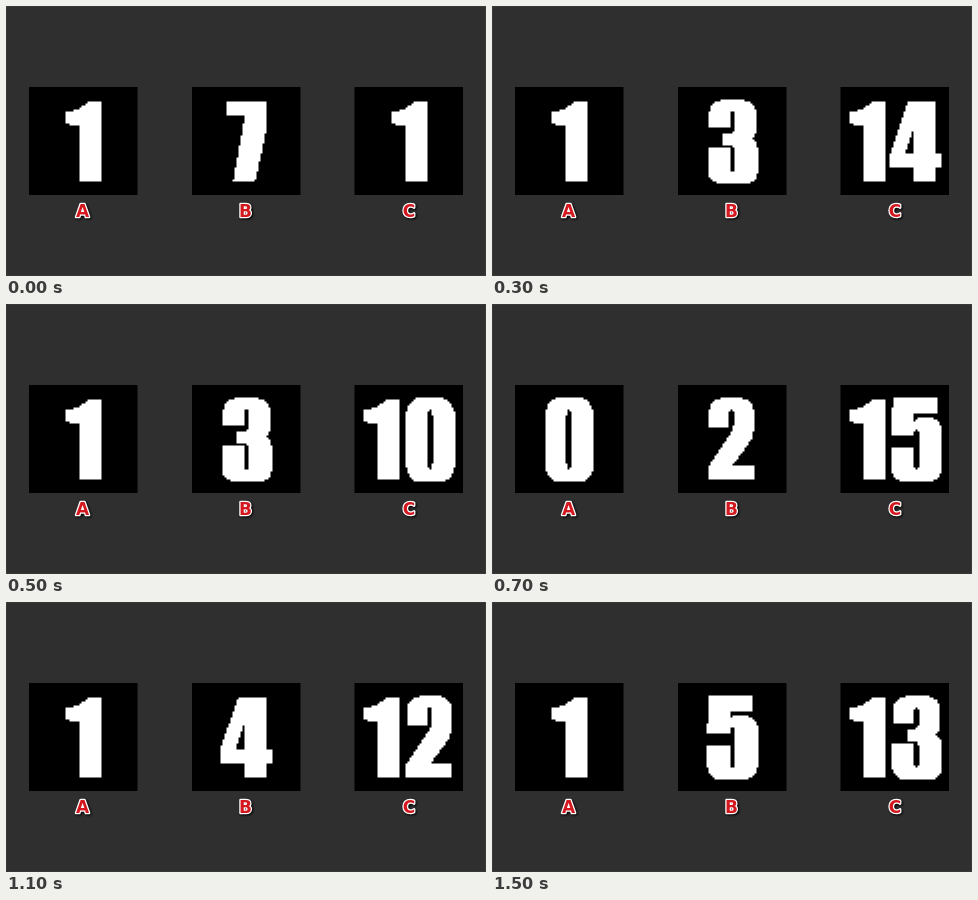
Write an HTML page with a canvas that moves like this. It is 480x270 px and loops after 1.6 s.

```html
<!DOCTYPE html>
<html lang="en">
<head>
<meta charset="utf-8">
<title>Random numbers</title>
<style>
html, body { margin: 0; width: 100%; height: 100%; overflow: hidden; background: #2f2f2f; }
#stage { position: relative; width: 480px; height: 270px; overflow: hidden; }
#stage::after { content: ""; position: absolute; inset: 0; border: 1px solid #393939; }
canvas, svg { position: absolute; left: 0; top: 0; }
text {
  font: bold 17px "DejaVu Sans", sans-serif; text-anchor: middle;
  fill: #d3191f; stroke: #fff; stroke-width: 2.6px; stroke-linejoin: round; paint-order: stroke;
  filter: drop-shadow(1px 1px 1px #000);
}
</style>
</head>
<body>
<div id="stage">
  <canvas id="view" width="480" height="270"></canvas>
  <svg width="480" height="270">
    <text x="76.5" y="211">A</text>
    <text x="239.5" y="211">B</text>
    <text x="403" y="211">C</text>
  </svg>
</div>
<script>
const CELL = 2, SIZE = 54, STEP = 100, TOP = 81, PHASE = 0.5;
const lefts = [23, 186, 348.5];

// Digit outlines in tile pixels
const glyphs = {
  0: "M42 13H66Q76 15 79 29V81Q76 95 66 97H42Q33 95 30 81V29Q33 15 42 13ZM53 25L51 32V78L53 84H55L57 78V32L55 25Z",
  1: "M58 15H73V95H51V43Q51 39 48 38.5L37 37V25Q50 24 58 15Z",
  2: "M31 43V30Q31 13 48 13H60Q76 13 76 30V42Q76 52 69 61L54 81H76V95H30V82L50 52Q56 44 56 36V30Q56 25 53.5 25Q51 25 51 30V43Z",
  3: "M31 40V29Q31 13 48 13H62Q78 13 78 28V43Q78 50 73 52Q80 55 80 64V82Q80 97 64 97H47Q30 97 30 82V60H52V80Q52 85 54.5 85Q57 85 57 80V65Q57 58 51 58H45V46H50Q57 46 57 41V30Q57 25 54.5 25Q52 25 52 30V40Z",
  4: "M46 15H74V67H80V81H74V95H52V81H28V67ZM52 40L43 67H52Z",
  5: "M31 13H75V28H52V36Q56 32 62 32Q80 32 80 48V80Q80 97 62 97H46Q29 97 29 80V62H52V80Q52 85 54.5 85Q57 85 57 80V50Q57 45 54.5 45Q52 45 52 51H29Z",
  7: "M35 15H75V36Q74 45 73 50L63 95H41L53 28H35Z"
};
for (const d in glyphs) glyphs[d] = new Path2D(glyphs[d]);

const rows = [
  "1 0 0 1 0 1 1 0 1 0 0 1 1 0 0 1",
  "7 1 4 3 5 3 0 2 5 7 1 4 2 5 0 5",
  "1 5 12 14 3 10 7 15 2 10 4 12 0 1 11 13"
].map(row => row.split(" "));

const view = document.getElementById("view").getContext("2d");
const small = document.createElement("canvas").getContext("2d");
small.canvas.width = small.canvas.height = SIZE;
small.fillStyle = "#fff";

// Coarse fill: a cell is white when its centre lies inside the outline
function drawDigit(digit, shift) {
  for (let y = 0; y < SIZE; y++) {
    for (let x = 0; x < SIZE; x++) {
      const px = (x + 0.5) * CELL + PHASE - shift, py = (y + 0.5) * CELL + PHASE;
      if (small.isPointInPath(glyphs[digit], px, py, "evenodd")) small.fillRect(x, y, 1, 1);
    }
  }
}

function drawTile(left, number) {
  small.clearRect(0, 0, SIZE, SIZE);
  const shifts = number.length > 1 ? [-28, 21] : [0];
  shifts.forEach((shift, i) => drawDigit(number[i], shift));
  view.fillStyle = "#000";
  view.fillRect(left, TOP, 108.5, 108);
  view.drawImage(small.canvas, Math.round(left) + PHASE, TOP + PHASE, SIZE * CELL, SIZE * CELL);
}

let shown = -1;
function tick() {
  const step = Math.floor(performance.now() / STEP) % rows[0].length;
  if (step !== shown) {
    shown = step;
    view.clearRect(0, 0, 480, 270);
    lefts.forEach((left, i) => drawTile(left, rows[i][step]));
  }
  requestAnimationFrame(tick);
}
tick();
</script>
</body>
</html>
```
